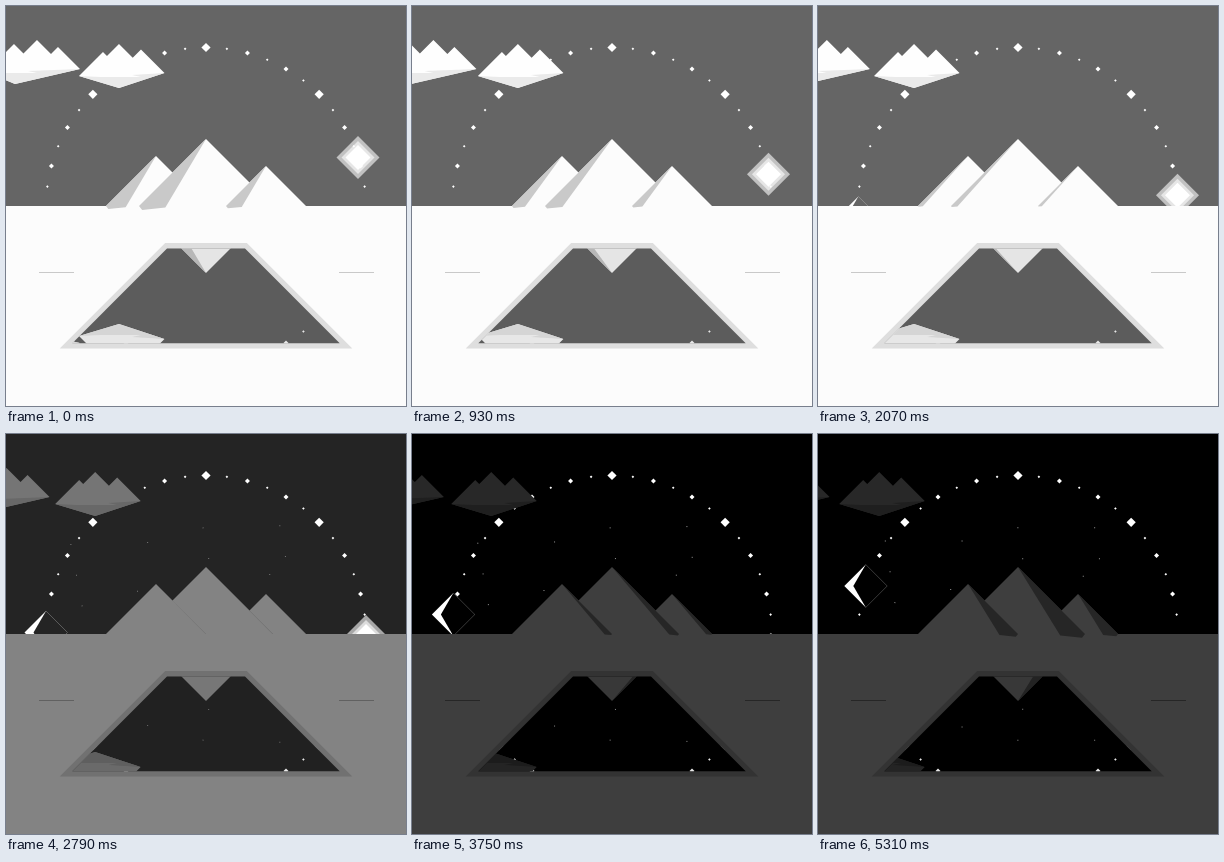
An HTML page with a canvas for the animation above (5340 ms loop, 400 by 400 pixels).

```html
<!DOCTYPE html>
<html lang="en">
<head>
<meta charset="utf-8">
<title>Day and night</title>
<style>
html, body { margin: 0; width: 100%; height: 100%; overflow: hidden; background: #656565; }
canvas { display: block; width: 400px; height: 400px; }
</style>
</head>
<body>
<canvas width="400" height="400"></canvas>
<script>
const ctx = document.querySelector('canvas').getContext('2d');
const LOOP = 5340, SIZE = 400, MID = 200, HORIZON = 200, RADIUS = 160, RAD = Math.PI / 180;

// Apex x and height; every slope is 45 degrees
const mountains = [[150, 50], [260, 40], [200, 67]];

let night = 0;

// Grey that blends from its day level to its night level
const grey = (day, dark) => {
  const v = Math.round(day + (dark - day) * night);
  return `rgb(${v},${v},${v})`;
};

function trace(points) {
  ctx.beginPath();
  for (const [x, y] of points) ctx.lineTo(x, y);
  ctx.closePath();
}

function poly(fill, ...points) {
  trace(points);
  ctx.fillStyle = fill;
  ctx.fill();
}

const diamond = (fill, x, y, r) => poly(fill, [x - r, y], [x, y - r], [x + r, y], [x, y + r]);

// Standard CSS "ease" curve
function ease(u) {
  if (u <= 0) return 0;
  if (u >= 1) return 1;
  let lo = 0, hi = 1, p;
  for (let i = 0; i < 20; i++) {
    p = (lo + hi) / 2;
    if (0.75 * p * (1 - p) + p ** 3 < u) lo = p; else hi = p;
  }
  return 0.3 * p * (1 - p) ** 2 + 3 * p * p * (1 - p) + p ** 3;
}

const onArc = deg => [MID + RADIUS * Math.cos(deg * RAD), 201.5 - RADIUS * Math.sin(deg * RAD)];

// Evenly scattered stars that turn slowly about the horizon's middle
function drawStars(t) {
  ctx.save();
  ctx.translate(MID, HORIZON);
  ctx.rotate(0.6 * (t - 3.75) * RAD);
  ctx.fillStyle = `rgba(255,255,255,${0.6 * night})`;
  for (let i = 1; i <= 14; i++) {
    const x = 60 + 270 * (i * 0.7549 % 1), y = 78 + 110 * (i * 0.5698 % 1);
    ctx.fillRect(x - MID, y - HORIZON, 1, 1);
  }
  ctx.restore();
}

function drawArc() {
  for (let i = 1; i < 24; i++) {
    diamond('#fff', ...onArc(i * 7.5), i % 6 == 0 ? 4.6 : i % 2 ? 1.3 : 2.5);
  }
}

function drawSun(angle) {
  const [x, y] = onArc(angle);
  diamond('rgba(255,255,255,.6)', x, y, 21.5);
  diamond('rgba(255,255,255,.6)', x, y, 16.5);
  diamond('#fff', x, y, 12.5);
}

function drawMoon(angle) {
  const [x, y] = onArc(180 - angle), r = 21.5;
  diamond('#fff', x, y, r);
  poly(grey(101, 0), [x, y - r], [x + r, y], [x, y + r], [x - 12.5, y]);
}

// Three peaks with 45 degree sides, above a pointed keel
function drawCloud(peaks, [kx, ky], shift) {
  const [first, , last] = peaks;
  const left = [first[0] + first[1] - ky + 12, ky - 12];
  const right = [last[0] - last[1] + ky - 15, ky - 15];
  const ridge = peaks.flatMap(([x, y], i) => {
    if (!i) return [[x, y]];
    const [px, py] = peaks[i - 1];
    return [[(px + x + y - py) / 2, (py + y + x - px) / 2], [x, y]];
  });
  ctx.save();
  ctx.translate(-shift, 0);
  poly(grey(254, 40), left, ...ridge, right, [kx, ky]);
  poly(grey(234, 31), left, [kx, ky], right, [kx + 13, ky - 13], [kx + 22, ky - 11], [kx - 18, ky - 11]);
  ctx.restore();
}

function drawMountains() {
  for (const [x, h] of mountains) {
    poly(grey(252, 62), [x, HORIZON - h], [x + h, HORIZON], [x - h, HORIZON]);
  }
}

// The shaded face lies opposite the sun and widens with its height
function drawShades(angle) {
  for (const [x, h] of mountains) {
    const w = h * 0.0216 * angle, drop = Math.abs(w) * 0.15;
    const corner = x - Math.sign(angle) * h;
    poly(grey(201, 38), [x, HORIZON - h], [corner, HORIZON], [corner + w * 0.12, HORIZON + drop],
      [corner + w, HORIZON + drop * 0.4]);
  }
}

function drawSky(t, angle) {
  ctx.fillStyle = grey(101, 0);
  ctx.fillRect(0, 0, SIZE, HORIZON);
  drawStars(t);
  drawArc();
  drawSun(angle);
  drawMoon(6.7 * t - 17.6);
  drawCloud([[8, 38], [31, 34], [52, 41]], [9, 78], 10 * t + 0.33 * t * t);
  drawCloud([[97, 46], [113, 38], [135, 43.5]], [113, 82], 7.2 * t + 0.48 * t * t);
  drawMountains();
}

// Symmetric trapezoid with 45 degree sides
const pondShape = (top, bottom, half) => [[MID - half, top], [MID + half, top],
  [MID + half + bottom - top, bottom], [MID - half - bottom + top, bottom]];

function drawPond(t, angle) {
  poly(grey(222, 51), ...pondShape(237, 342.5, 40.8));
  ctx.save();
  trace(pondShape(242.5, 337.2, 39));
  ctx.clip();
  ctx.translate(0, SIZE);
  ctx.scale(1, -1);
  drawSky(t, angle);
  drawShades(angle);
  ctx.fillStyle = 'rgba(0,0,0,.09)';
  ctx.fillRect(0, 0, SIZE, HORIZON);
  ctx.restore();
}

function draw(t) {
  const angle = 18.2 - 6.65 * t;
  night = ease(t - 2.42);
  drawSky(t, angle);
  ctx.fillStyle = grey(252, 62);
  ctx.fillRect(0, HORIZON, SIZE, HORIZON);
  drawShades(angle);
  ctx.fillStyle = grey(201, 38);
  for (const x of [33, 333]) ctx.fillRect(x, 266, 35, 1);
  drawPond(t, angle);
}

const start = performance.now();
function frame() {
  draw((performance.now() - start) % LOOP / 1000);
  requestAnimationFrame(frame);
}
frame();
</script>
</body>
</html>
```
